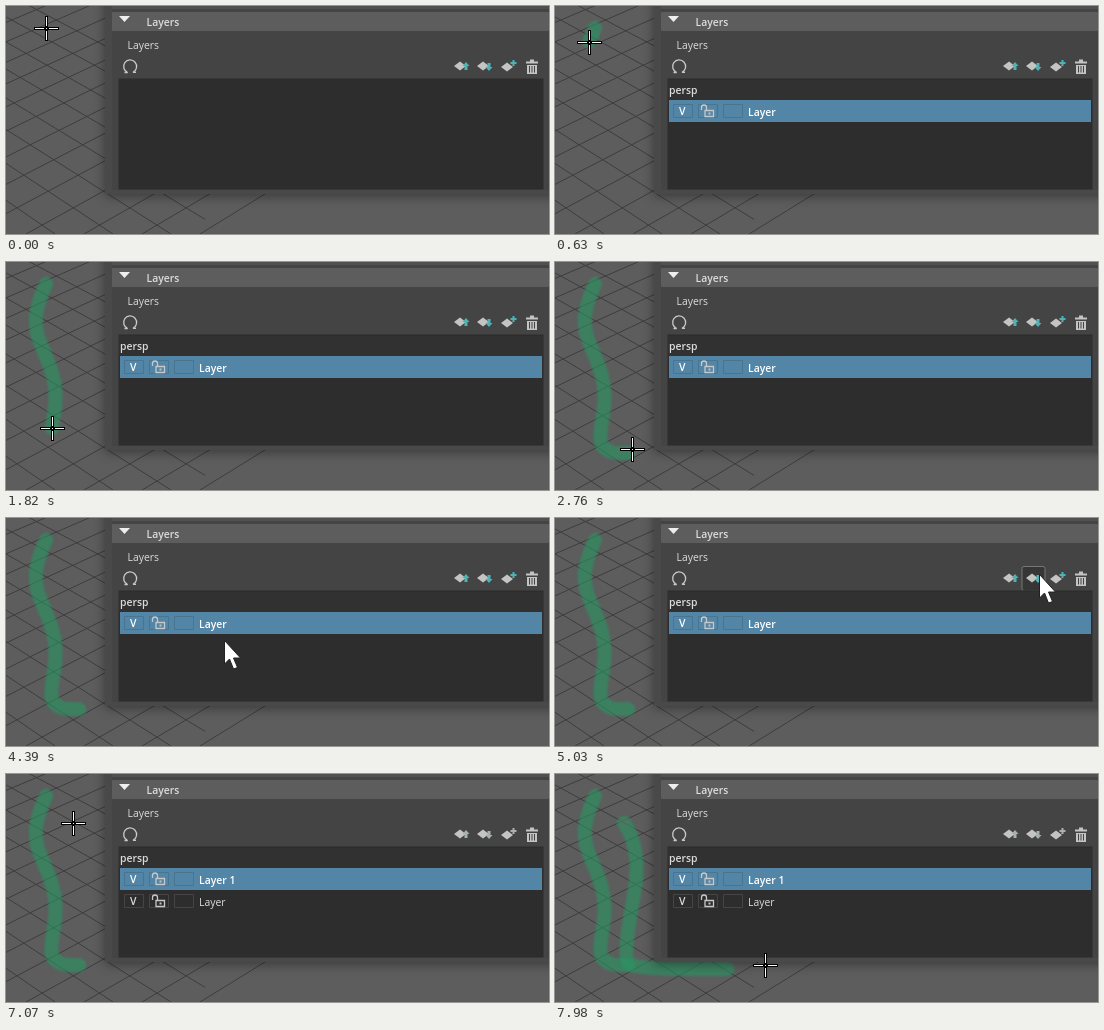
Write an HTML page that moves like this. It is 543 px wide and 228 px high and loops after 8 s.

```html
<!DOCTYPE html>
<html lang="en">
<head>
<meta charset="utf-8">
<title>Layers panel</title>
<style>
  html, body { margin: 0; width: 100%; height: 100%; overflow: hidden; background: #5d5d5d; }
  svg { display: block; width: 543px; height: 228px; }
  svg { --cell: #454545; --ink: #ddd; --accent: #4fb3b5; }
  text { font: 10.4px "Open Sans", "Noto Sans", sans-serif; fill: var(--ink); white-space: pre; }
  .strong { font-weight: 600; }
  .grid { fill: none; stroke: #3d3d3d; }
  .paint { fill: none; stroke: #299765; stroke-opacity: .6; stroke-width: 14;
           stroke-linecap: round; stroke-linejoin: round; filter: url(#soft); }
  .shadow { filter: drop-shadow(0 2px 6px rgb(0 0 0 / .4)); }
  .accent { fill: var(--accent); }
  .dull { --accent: #a9b0b0; }
  .icon { fill: #c4c4c4; }
  .line { fill: none; stroke: #c8c8c8; stroke-width: 1.3; }
  .cell { fill: none; stroke: var(--cell); }
  .selected { --cell: #47748f; --ink: #fff; }
</style>
</head>
<body>
<svg viewBox="0 0 543 228">
  <defs>
    <filter id="soft" filterUnits="userSpaceOnUse" width="543" height="228" x="0" y="0">
      <feGaussianBlur stdDeviation="1"/>
    </filter>
    <path id="diamond" class="icon" d="M-6 0L0 -4.500L6 0L0 4.500Z"/>
    <path id="up" class="accent" d="M0 -4L3.500 0H1.500V4H-1.500V0H-3.500Z"/>
    <g id="boxes">
      <path class="cell" d="M118.500 4.500h19v13h-19zM143.500 4.500h19v13h-19zM168.500 4.500h19v13h-19z"/>
      <text class="strong" x="124" y="15">V</text>
      <path class="line" d="M146.500 10V7.500a2.500 2.500 0 0 1 5 0V10M150 10.500h8.500v6H150z"/>
      <path class="icon" d="M153.500 12.500h2v2h-2z"/>
    </g>
    <!-- Pointer routes that leave no paint -->
    <path id="lift" d="M79 191L77 187"/>
    <path id="approach" d="M77 187Q150 140 217 122T459 55"/>
    <path id="aim" d="M459 55L500 56"/>
    <path id="leave" d="M500 56Q484 60 470 66C300 130 120 60 67 49"/>
  </defs>

  <rect width="543" height="228" fill="#5d5d5d"/>
  <path id="grid" class="grid"/>
  <path id="first" class="paint" d="M40 22C32 40 25 58 34 80S52 118 49 145S38 188 62 191H79"/>
  <path id="second" class="paint" d="M69 49C82 66 84 95 79 120C76 140 66 186 75 190C85 196 140 195 172 195L210 191"/>
  <circle id="ring" cx="69.500" cy="49" r="6" fill="#5d6d65" fill-opacity=".4" stroke="#2f8a60" stroke-opacity=".6"/>

  <g id="panel">
    <rect class="shadow" x="99" y="-20" width="460" height="208" fill="#494949"/>
    <rect x="106" width="437" height="184" fill="#444"/>
    <rect x="106" width="437" height="3" fill="#515151"/>
    <rect x="106" y="6" width="437" height="19" rx="1" fill="#5d5d5d"/>
    <path d="M113 10h11l-5.500 6z" fill="#eee"/>
    <text class="strong" x="140.500" y="20">Layers</text>
    <text x="121.500" y="43" fill="#ddd">Layers</text>
    <path class="line" d="M118.500 66.500h3.200A6.500 6.500 0 1 1 127 66.300h3"/>

    <rect id="hover" y="48.500" width="23" height="24" rx="2" fill="#363636" stroke="#777"/>
    <g id="icons">
      <use href="#diamond" x="454" y="60"/>
      <use href="#up" x="460" y="60"/>
      <use href="#diamond" x="477" y="60"/>
      <use href="#up" transform="translate(483 61) scale(1 -1)"/>
      <use href="#diamond" x="501" y="61"/>
      <path class="accent" d="M506.500 54h2v2h2v2h-2v2h-2v-2h-2v-2h2z"/>
    </g>
    <path class="icon" d="M520 55.500h4v-2h4v2h4v2h-12zM521 59h10v9h-10z"/>
    <path stroke="#444" d="M523.500 60v6.500M526 60v6.500M528.500 60v6.500"/>

    <rect x="112.500" y="72.500" width="425" height="111" rx="1" fill="#2d2d2d" stroke="#383838"/>
    <g id="list">
      <rect x="113" y="74" width="424" height="20" fill="#313131"/>
      <text class="strong" x="114" y="88">persp</text>
      <g class="selected" transform="translate(0 94)">
        <rect x="114" width="422" height="22" fill="#5285a6"/>
        <use href="#boxes"/>
        <text id="topName" class="strong" x="193" y="16">Layer</text>
      </g>
      <g id="lower" transform="translate(0 116)">
        <use id="lowerBoxes" href="#boxes"/>
        <text x="193" y="16">Layer</text>
      </g>
    </g>
  </g>

  <g id="cross" fill="none">
    <path stroke="#000" stroke-width="3" d="M-12 .5h25M.5 -12v25"/>
    <path stroke="#fff" d="M-11 .5h9M3 .5h9M.5 -11v9M.5 3v9M0 .5h1"/>
  </g>
  <path id="arrow" fill="#fff" stroke="#222"
        d="M.5 .5V24L5.500 19L9.500 29L13.500 27.500L9.500 18H16.500Z"/>
</svg>

<script>
const LOOP = 8000, STEP = 66;
const $ = id => document.getElementById(id);

const linear = u => u;
const glide = u => .2 * u + .8 * u * u * (3 - 2 * u);

const MOVES = [
  { path: $('first'), start: 500, end: 2290, ease: linear },
  { path: $('lift'), start: 2670, end: 2760, ease: linear },
  { path: $('approach'), start: 4060, end: 4840, ease: glide },
  { path: $('aim'), start: 4840, end: 5160, ease: linear },
  { path: $('leave'), start: 6290, end: 7070, ease: glide },
  { path: $('second'), start: 7120, end: 7980, ease: linear }
];

function travelled({ path, start, end, ease }, t) {
  const steps = Math.round((end - start) / STEP);
  const u = Math.floor((t - start) / (end - start) * steps + .3) / steps;
  return path.getTotalLength() * ease(Math.min(1, Math.max(0, u)));
}

function pointer(t) {
  const move = MOVES.filter(m => m.start <= t).pop() || MOVES[0];
  return move.path.getPointAtLength(travelled(move, t));
}

// Paint stops a little before the pointer's route ends.
function paint(move, t, unpainted) {
  const length = Math.min(travelled(move, t), move.path.getTotalLength() - unpainted);
  move.path.style.strokeDasharray = `${length} 999`;
  show(move.path.id, length > 0);
}

// Floor in perspective: each family of lines is evenly spaced along the
// bottom edge and meets at a vanishing point on the horizon.
function drawGrid() {
  const bottom = 228, horizon = -700, reach = 1500, middle = 200, gap = 58, edge = 194;
  let d = '';
  for (let k = 0; k < 13; k++) {
    d += `M${edge - gap * k} ${bottom}L${middle + reach} ${horizon}`;
    const x = edge + 29 + gap * (4 - k), left = middle - reach;
    // Cut at the floor's right-hand border.
    const fall = (bottom - horizon) / (x - left);
    const rise = (bottom - horizon) / (middle + reach - edge);
    const cut = Math.max(0, (x - edge) * rise / (fall + rise));
    d += `M${x - cut / fall * (x > edge ? fall / rise * 0 + 1 : 0)} ${bottom - cut}L${left} ${horizon}`;
  }
  $('grid').setAttribute('d', d);
}

function show(id, on) { $(id).style.display = on ? '' : 'none'; }

function draw(t) {
  const { x, y } = pointer(t), last = pointer(t - STEP);
  const overPanel = x > 98 && y < 189;
  const added = t >= 5350, refreshing = added && t < 5700;

  paint(MOVES[0], t, 6);
  paint(MOVES[5], t, 38);
  show('ring', t > 7300);

  show('list', t >= 500);
  show('lower', added);
  show('lowerBoxes', !refreshing);
  $('topName').textContent = added ? 'Layer 1' : 'Layer';
  $('icons').setAttribute('class', added ? 'dull' : '');

  const button = Math.min(2, Math.floor((last.x - 443) / 23.5));
  show('hover', button >= 0 && last.y < 73 && !refreshing);
  $('hover').setAttribute('x', 443.5 + 23.5 * button);

  show('cross', !overPanel);
  show('arrow', overPanel);
  $(overPanel ? 'arrow' : 'cross')
    .setAttribute('transform', `translate(${Math.round(x)} ${Math.round(y)})`);
}

function frame() {
  draw(performance.now() % LOOP);
  requestAnimationFrame(frame);
}

drawGrid();
frame();
</script>
</body>
</html>
```
